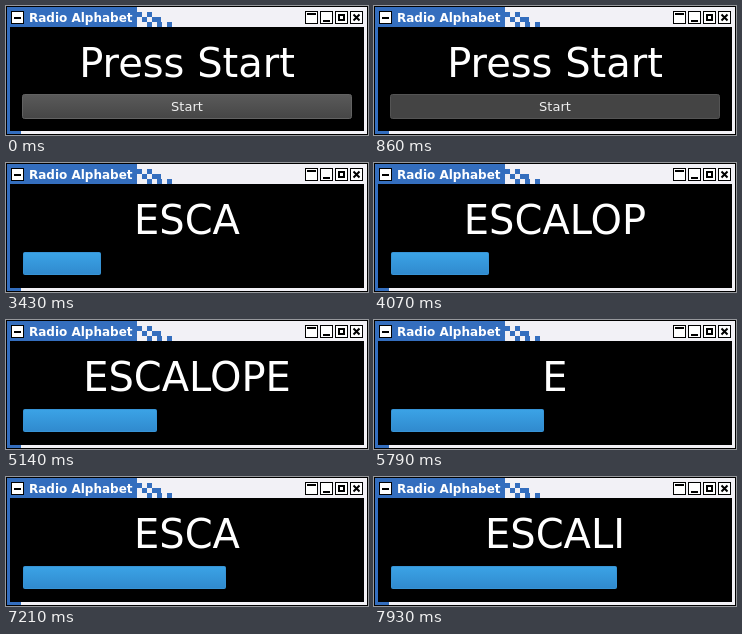
Recreate the animation shown at these times as an HTML page. Size 362 by 129 pixels, loop 8000 ms.

```html
<!DOCTYPE html>
<html lang="en">
<head>
<meta charset="utf-8">
<title>Radio Alphabet</title>
<style>
  html, body { margin: 0; width: 100%; height: 100%; overflow: hidden; background: #000; }
  svg { display: block; width: 362px; height: 129px; }
  text { font-family: "DejaVu Sans", sans-serif; fill: #fff; }
  .crisp { shape-rendering: crispEdges; }
  .blue { fill: #346ebe; }
  .light { fill: #f2f1f6; }
  .title { font-size: 12px; font-weight: bold; }
  .word { font-size: 40px; text-anchor: middle; }
  .label { font-size: 13px; text-anchor: middle; fill: #f0f0f0; }
  .box { fill: #fff; stroke: #000; }
  .glyph { fill: none; stroke: #000; stroke-width: 2; }
</style>
</head>
<body>
<svg viewBox="0 0 362 129">
  <defs>
    <linearGradient id="raised" x2="0" y2="1">
      <stop stop-color="#5a5a5a"/><stop offset="1" stop-color="#464646"/>
    </linearGradient>
    <linearGradient id="chunk" x2="0" y2="1">
      <stop stop-color="#3ba3e6"/><stop offset="1" stop-color="#308ace"/>
    </linearGradient>
  </defs>

  <g class="crisp">
    <rect width="362" height="129"/>
    <rect class="light" x="1" y="1" width="360" height="127"/>
    <path class="blue" d="M1 1H131V21H4V125H15V128H1Z"/>
    <!-- checkered end of the title -->
    <path class="blue" d="M131 6h5v5h-5zM141 6h5v5h-5zM136 11h5v5h-5zM146 11h5v5h-5zM151 11h4v5h-4zM141 16h5v5h-5zM151 16h5v5h-5zM161 16h5v5h-5z"/>
    <rect x="4" y="21" width="354" height="104"/>
    <g transform="translate(5 5)">
      <rect class="box" x=".5" y=".5" width="12" height="12"/><path class="glyph" d="M3 7H10"/>
    </g>
    <g transform="translate(299 5)">
      <rect class="box" x=".5" y=".5" width="12" height="12"/><path class="glyph" d="M2 3H11"/>
    </g>
    <g transform="translate(314 5)">
      <rect class="box" x=".5" y=".5" width="12" height="12"/><path class="glyph" d="M3 10H10"/>
    </g>
    <g transform="translate(329 5)">
      <rect class="box" x=".5" y=".5" width="12" height="12"/><path class="glyph" d="M4 4H9V9H4Z"/>
    </g>
    <g transform="translate(344 5)">
      <rect class="box" x=".5" y=".5" width="12" height="12"/>
      <path class="glyph" shape-rendering="auto" d="M3.5 3.5L9.5 9.5M9.5 3.5L3.5 9.5"/>
    </g>
  </g>
  <text class="title" x="23" y="16">Radio Alphabet</text>

  <text class="word" id="word" x="181" y="71">Press Start</text>
  <g id="button">
    <rect id="face" x="16.5" y="88.5" width="329" height="24" rx="2" fill="url(#raised)" stroke="#626262"/>
    <text class="label" x="181" y="105">Start</text>
  </g>
  <rect id="bar" x="17.5" y="89.5" height="22" rx="1" fill="url(#chunk)" stroke="#3793d5"/>
</svg>
<script>
  const LOOP = 8000, PRESS = 860, START = 1010, TICK = 100;
  const CLEAR = 5430;
  const rounds = [
    { word: "ESCALOPE", keys: [2070, 2640, 3140, 3360, 3580, 3760, 3920, 4080] },
    { word: "ESCALI", keys: [5790, 6130, 6430, 6930, 7570, 7790] }
  ];
  const [word, button, face, bar] =
    ["word", "button", "face", "bar"].map(id => document.getElementById(id));

  function typed(t) {
    if (t < START) return "Press Start";
    const round = rounds[t < CLEAR ? 0 : 1];
    return round.word.slice(0, round.keys.filter(key => key <= t).length);
  }

  function draw(now) {
    const t = now % LOOP;
    const ticks = Math.floor((t - START) / TICK);
    const text = typed(t);
    if (word.textContent !== text) word.textContent = text;
    button.style.display = t < START ? "" : "none";
    face.setAttribute("fill", t < PRESS ? "url(#raised)" : "#444");
    face.setAttribute("stroke", t < PRESS ? "#626262" : "#545454");
    bar.style.display = ticks > 0 ? "" : "none";
    bar.setAttribute("width", Math.max(0, Math.round(ticks * 3.28 - 0.7) - 1));
    requestAnimationFrame(draw);
  }
  draw(0);
</script>
</body>
</html>
```
